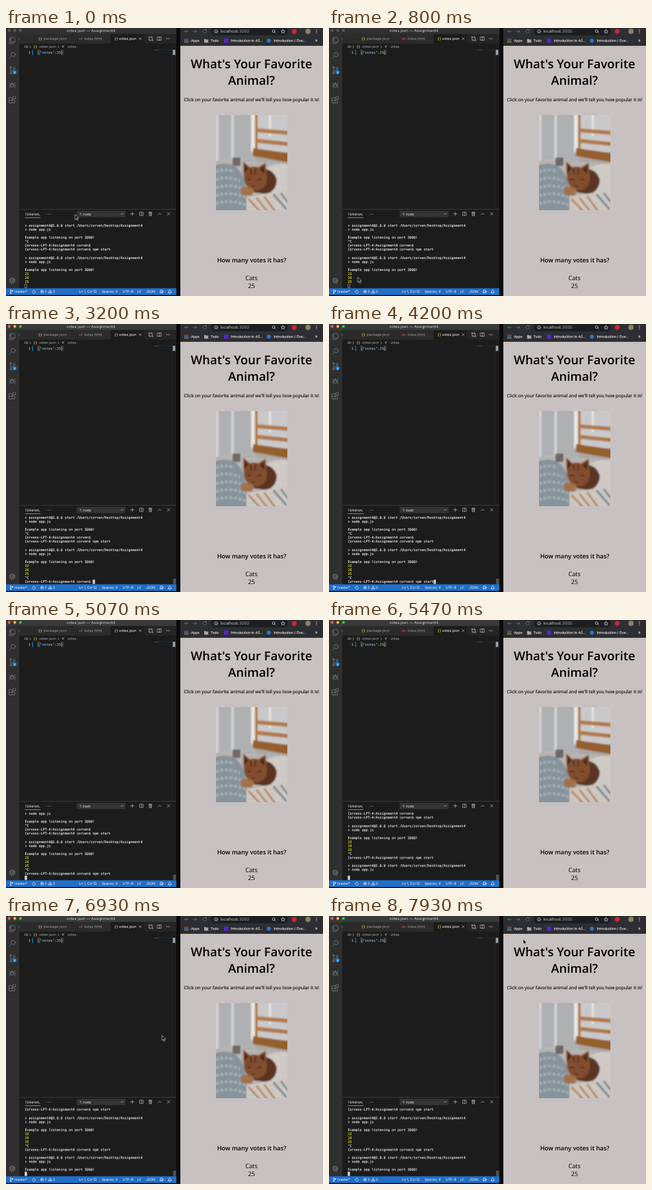
These frames come from a looping animation (480 by 406 pixels, 8 s). An HTML page:

```html
<!DOCTYPE html>
<html lang="en">
<head>
<meta charset="utf-8">
<title>Vote counter demo</title>
<style>
  html, body { margin: 0; width: 100%; height: 100%; overflow: hidden; background: #0b0b0c; }
  .stage { position: relative; width: 480px; height: 406px; overflow: hidden; }
  svg { position: absolute; left: 0; top: 0; }
  text, pre { text-rendering: geometricPrecision; white-space: pre; }
  .ui { font-family: Inter, Roboto, sans-serif; font-size: 5.5px; fill: #ccc; }
  .status { font-size: 5.1px; fill: #fff; }
  .marks { font-size: 5.2px; fill: #f0f0f2; stroke: #f0f0f2; stroke-width: .1; }
  .mono, pre { font-family: "DejaVu Sans Mono", monospace; }
  .page { font-family: "Open Sans", "Noto Sans", sans-serif; font-size: 9.24px; text-anchor: middle; fill: #000; }
  .bold { font-weight: 600; }
  .line { fill: none; stroke: #7d7d7d; stroke-width: .75; stroke-linecap: round; stroke-linejoin: round; }
  .thin { stroke: #c5c5c5; stroke-width: .65; }

  /* terminal: rows are 6.04px high, characters 3.025px wide */
  .term { position: absolute; left: 28.5px; top: 290.4px; width: 222px; height: 103.6px; overflow: hidden; }
  pre { position: absolute; left: 0; top: 6.8px; margin: 0; font-size: 5.025px; line-height: 6.04px; color: #f4f4f4;
        -webkit-text-stroke: .12px; animation: scroll 8s step-end infinite; }
  pre b { font-weight: 400; color: #f0f01c; }
  pre i { font-style: normal; }
  .caret { animation: caret 8s step-end infinite; }

  .focus  { animation: focus 8s step-end infinite; }
  .abort  { animation: abort 8s step-end infinite; }
  .typed  { animation: typed 8s step-end infinite; }
  .listen { animation: listen 8s step-end infinite; }
  .bash   { opacity: 0; animation: bash 8s step-end infinite; }
  .node   { animation: node 8s step-end infinite; }
  .arrow  { animation: arrowPath 8s linear infinite, arrowShow 8s step-end infinite; }
  .beam   { opacity: 0; animation: beamPath 8s linear infinite, beamShow 8s step-end infinite; }

  @keyframes focus  { 0% { opacity: 0 } 15.875%, 100% { opacity: 1 } }
  @keyframes abort  { 0% { opacity: 0 } 38.375%, 100% { opacity: 1 } }
  @keyframes typed  { 0% { opacity: 0 } 50.875%, 100% { opacity: 1 } }
  @keyframes listen { 0% { opacity: 0 } 70%, 100% { opacity: 1 } }
  @keyframes bash   { 0% { opacity: 0 } 40.875% { opacity: 1 } 64.125%, 100% { opacity: 0 } }
  @keyframes node   { 0% { opacity: 1 } 40.875% { opacity: 0 } 64.125%, 100% { opacity: 1 } }
  @keyframes scroll {
    0% { transform: none }
    39.125% { transform: translateY(-6.04px) }
    63.375% { transform: translateY(-12.08px) }
    68.375% { transform: translateY(-36.24px) }
    70%, 100% { transform: translateY(-42.28px) }
  }
  @keyframes caret {
    0% { transform: none }
    38.375% { transform: translateX(6.05px) }
    39.125% { transform: translateX(102.85px) }
    50.875% { transform: translateX(130.08px) }
    63.375%, 100% { transform: none }
  }
  @keyframes arrowPath {
    0%, 5% { transform: translate(104.5px, 282.5px); animation-timing-function: ease-in-out }
    10% { transform: translate(43.5px, 377.5px) }
    15%, 77.4% { transform: translate(44px, 387px) }
    77.5% { transform: translate(225px, 258px) }
    78.375% { transform: translate(248.5px, 246.5px) }
    80%, 83.375% { transform: translate(249px, 246px); animation-timing-function: ease-in }
    87.5% { transform: translate(230px, 150px); animation-timing-function: ease-out }
    93.375%, 97.5% { transform: translate(264.5px, 45px) }
    99.125%, 100% { transform: translate(294px, 35px) }
  }
  @keyframes arrowShow { 0% { opacity: 1 } 15.875% { opacity: 0 } 77.5%, 100% { opacity: 1 } }
  @keyframes beamPath {
    0%, 15.875% { transform: translate(46px, 388px) }
    20.875%, 38.375% { transform: translate(52px, 389.5px) }
    74.125% { transform: translate(54px, 378px) }
    77.5%, 100% { transform: translate(225px, 262px) }
  }
  @keyframes beamShow {
    0% { opacity: 0 } 15.875% { opacity: 1 } 38.375% { opacity: 0 }
    74.125% { opacity: 1 } 77.5%, 100% { opacity: 0 }
  }
</style>
</head>
<body>
<div class="stage">
<svg width="480" height="406" viewBox="0 0 480 406">
  <defs>
    <pattern id="slats" width="4" height="3" patternUnits="userSpaceOnUse">
      <rect width="4" height="3" fill="#989b9f"/><rect width="4" height="1.5" fill="#c3c3c4"/>
    </pattern>
    <clipPath id="frame"><rect x="318" y="132" width="108" height="144"/></clipPath>
    <filter id="soft"><feGaussianBlur stdDeviation="1"/></filter>
  </defs>

  <!-- editor window -->
  <rect width="258" height="404.5" fill="#1c1c1c"/>
  <rect width="258" height="9" fill="#303031"/>
  <g fill="#5b5b5c"><circle cx="4.8" cy="3.7" r="2.1"/><circle cx="13.3" cy="3.7" r="2.1"/><circle cx="21.8" cy="3.7" r="2.1"/></g>
  <g class="focus">
    <rect width="258" height="9" fill="#393939"/>
    <circle cx="4.8" cy="3.7" r="2.1" fill="#fc5b57"/><circle cx="13.3" cy="3.7" r="2.1" fill="#fdbc40"/><circle cx="21.8" cy="3.7" r="2.1" fill="#34c84a"/>
  </g>
  <text class="ui" x="128.5" y="5.8" style="font-size:5.9px" text-anchor="middle">votes.json — Assignment4</text>

  <rect y="9" width="20" height="385.5" fill="#2f2f2f"/>
  <rect x="20" y="9" width="238" height="14.5" fill="#252526"/>
  <path d="M20 9h23v14.5H20zM43.5 9h64v14.5h-64zM108 9h50v14.5h-50z" fill="#2b2b2b"/>
  <rect x="158.5" y="9" width="50.5" height="14.5" fill="#1c1c1c"/>
  <g class="ui">
    <g fill="#999">
      <text x="18.8" y="18">›</text><text x="57" y="18">package.json</text><text x="118.5" y="18">index.html</text>
    </g>
    <text x="171" y="18" fill="#fff">votes.json</text>
    <g class="mono" fill="#d5c93d" font-weight="700" style="font-size:5px">
      <text x="48.8" y="18">{}</text><text x="164" y="18">{}</text><text x="41.5" y="30.4">{}</text>
      <text x="110" y="18" fill="#e06b35">&lt;&gt;</text>
    </g>
    <g fill="#adadad" style="font-size:5.3px">
      <text x="27.5" y="30.4">db</text><text x="50" y="30.4">votes.json</text><text x="84.5" y="30.4">#</text><text x="93" y="30.4">votes</text>
    </g>
  </g>
  <g class="line thin">
    <path d="M201.5 14.5l3.4 3.4m0-3.4l-3.4 3.4M36 26.8l1.5 1.7-1.5 1.7M78.5 26.8l1.5 1.7-1.5 1.7"/>
    <circle cx="216.7" cy="13.8" r=".8"/><circle cx="221.5" cy="18.6" r=".8"/>
    <path d="M216.7 14.8v3.6h2.3m-1-1l1 1-1 1M221.5 17.6V14h-2.3m1-1l-1 1 1 1M229.5 13.5h5.5v5h-5.5zm2.75 0v5"/>
  </g>
  <g fill="#ccc"><circle cx="243" cy="16.2" r=".6"/><circle cx="245" cy="16.2" r=".6"/><circle cx="247" cy="16.2" r=".6"/></g>

  <rect x="39.7" y="33.2" width="1.3" height="7.6" fill="#1580b4"/>
  <g fill="none" stroke="#777" stroke-width=".5"><rect x="48" y="33.5" width="3.2" height="7"/><rect x="83.4" y="33.5" width="3.2" height="7"/></g>
  <text class="mono" x="34" y="38.9" font-size="5.3" fill="#d0d0d0">1</text>
  <text class="mono" x="48" y="38.9" font-size="5.3" fill="#e4e4e4">{<tspan fill="#9cdcfe">"votes"</tspan>:<tspan fill="#b5cea8">25</tspan>}</text>
  <path d="M224 33h28" stroke="#20384f" stroke-width=".8"/><path d="M224 33.7h7" stroke="#526a78" stroke-width=".6"/>
  <path d="M251.5 33v241" stroke="#2c2c2c" stroke-width=".6"/>
  <rect x="252" y="33" width="5" height="8" fill="#555"/><rect x="253.5" y="33" width="2" height="7.5" fill="#a9c8df"/>

  <!-- activity bar -->
  <g class="line">
    <path d="M7.5 14h4l2.2 2.2v5H7.5zM7.5 16H5.3v7.5h6v-2.2"/>
    <circle cx="10.8" cy="40.2" r="3.2"/><path d="M8.4 42.6l-3.2 3.4"/>
    <circle cx="7" cy="59.5" r="1.3"/><circle cx="7" cy="68.5" r="1.3"/><circle cx="12.5" cy="61" r="1.3"/><path d="M7 61v6M12.5 62.500c0 3-5 2-5.500 4"/>
    <circle cx="9.5" cy="86.800" r="2.800"/><path d="M9.5 84v-1.500M7 85l-2-1.500M12 85l2-1.500M6.700 87.500H4.500M12.300 87.500h2.200M7 89l-2 1.800M12 89l2 1.800M8 86h3"/>
    <path d="M5 105.500h4v8H5zM5 109.500h8v4H9M11 104h3.500v3.500H11z"/>
    <circle cx="9.5" cy="382.700" r="1.300"/><circle cx="9.5" cy="382.700" r="3.900" stroke-width="1.400" stroke-dasharray="1.500 1.560" stroke-linecap="butt"/><circle cx="9.5" cy="382.700" r="3.100"/>
  </g>
  <circle cx="13" cy="67" r="3" fill="#1681d8"/>
  <text class="ui status" x="13" y="68.600" text-anchor="middle" style="font-size:4.3px">3</text>

  <!-- panel -->
  <path d="M20 274.700h238" stroke="#4a4a4a" stroke-width=".7"/>
  <path d="M28.500 287.300h24" stroke="#d0d0d0" stroke-width=".6"/>
  <rect x="107.700" y="277.500" width="73" height="8.600" fill="#343434" stroke="#444" stroke-width=".4"/>
  <g class="ui">
    <text x="28.500" y="283.600" fill="#f0f0f0" style="font-size:4.6px">TERMINAL</text>
    <g fill="#f4f4f4" style="font-size:5.1px"><text class="node" x="111.500" y="283.600">1: node</text><text class="bash" x="111.500" y="283.600">1: bash</text></g>
  </g>
  <g fill="#aaa"><circle cx="62" cy="282" r=".6"/><circle cx="64.300" cy="282" r=".6"/><circle cx="66.600" cy="282" r=".6"/></g>
  <g class="line thin">
    <path d="M174 280.800l1.800 1.800 1.800-1.800M188.600 281.500h5.200M191.200 278.900v5.200M202.800 279h5v5h-5zm2.500 0v5"/>
    <path d="M216 279.800h5.200M217.500 279.800v-1h2.200v1M216.700 279.800l.3 4.600h3.200l.3-4.600M218 281v2.200M219.300 281v2.200M230.400 282.700l2.200-2.300 2.200 2.300M244.300 279.600l4 4m0-4l-4 4"/>
  </g>
  <rect class="focus" x="253" y="386" width="4.500" height="8.500" fill="#4e4e4e"/>

  <!-- status bar -->
  <rect y="394.300" width="258" height="10.200" fill="#216fca"/>
  <g class="ui status">
    <text x="13" y="401.200">master*</text><text x="58.500" y="401.200">0</text><text x="71" y="401.200">0</text>
    <text x="110.500" y="401.200">Ln 1, Col 12</text><text x="145" y="401.200">Spaces: 4</text><text x="177" y="401.200">UTF-8</text>
    <text x="199" y="401.200">LF</text><text x="212" y="401.200">JSON</text>
  </g>
  <g class="line thin" style="stroke:#fff">
    <circle cx="7" cy="397.400" r=".7"/><circle cx="7" cy="401.600" r=".7"/><circle cx="9.700" cy="398" r=".7"/><path d="M7 398.200v2.600M9.700 398.800c0 1.500-2.500.7-2.700 2"/>
    <path d="M40 399.300a2.200 2.200 0 0 1 4.200-.8M44.400 399.700a2.200 2.200 0 0 1-4.200.8"/>
    <circle cx="54.500" cy="399.400" r="2.100"/><path d="M53.700 398.600l1.600 1.600m0-1.600l-1.600 1.600M67 397.300l2.300 4.100h-4.600zM67 399v.9"/>
    <circle cx="235.500" cy="399.400" r="2.400"/><path d="M234.400 400.200q1.100 1.100 2.200 0M234.600 398.600v.1M236.400 398.600v.1M245.800 401h4.600l-.7-1v-1.500q-.2-1.400-1.600-1.400t-1.600 1.400v1.500zM247.700 402h.8"/>
  </g>

  <!-- browser chrome -->
  <rect x="264" width="216" height="27" fill="#2d2e31"/>
  <rect x="310" y="-2" width="117" height="13" rx="6" fill="#1d1e21"/>
  <g class="line" style="stroke:#77797d">
    <path d="M276 5.200h-5.200m2.200-2.200l-2.200 2.200 2.200 2.200M283.500 5.200h5.200m-2.200-2.200l2.200 2.200-2.200 2.200"/>
    <path d="M303.300 3.600a2.700 2.700 0 1 0 .3 2.400M303.600 2.200v1.700h-1.700"/>
    <g style="stroke:#d3d5d8">
      <circle cx="318" cy="5.200" r="2.500" stroke-width=".6"/><path d="M318 5v1.400M318 3.800v.1"/>
      <circle cx="405.200" cy="4.800" r="1.900"/><path d="M406.700 6.300l1.800 1.800M419.500 2.200l.9 2 2.100.2-1.600 1.400.5 2.100-1.900-1.100-1.900 1.100.5-2.100-1.600-1.400 2.100-.2z" stroke-width=".7"/>
    </g>
  </g>
  <text class="ui" x="324.500" y="7.400" fill="#fff" style="font-size:6.2px">localhost<tspan fill="#9aa0a6">:3000</tspan></text>
  <circle cx="436.500" cy="5.200" r="3.600" fill="#cf2433"/>
  <circle cx="457.300" cy="5" r="4" fill="#8c8063"/>
  <g fill="#d3d5d8"><circle cx="470" cy="2.800" r=".7"/><circle cx="470" cy="5.200" r=".7"/><circle cx="470" cy="7.600" r=".7"/></g>
  <g stroke-width="1.400" stroke-dasharray="1.400 .8" fill="none">
    <path d="M270.300 17h6" stroke="#e15345"/><path d="M270.300 19.200h6" stroke="#4a8fe8"/><path d="M270.300 21.400h6" stroke="#e9b93d"/>
  </g>
  <path d="M300 16.700h2.500l.8.800h3v4.700H300z" fill="#a3a6aa"/>
  <rect x="330" y="16" width="6.500" height="6.500" fill="#5424cf"/>
  <circle cx="398" cy="19.200" r="3" fill="#2676cf"/>
  <g class="ui marks">
    <text x="280" y="21">Apps</text><text x="309.500" y="21">Todo</text><text x="340.500" y="21">Introduction to A2...</text>
    <text x="405.500" y="21">Introduction / Ove...</text><text x="468" y="21.200" style="font-size:6.5px">»</text>
  </g>

  <!-- page -->
  <rect x="264" y="27" width="216" height="379" fill="#c7c1c1"/>
  <g class="page">
    <g class="bold" style="font-size:18.48px"><text x="371.700" y="60.700">What's Your Favorite</text><text x="371.700" y="85.600">Animal?</text></g>
    <text x="371.800" y="111.400" stroke="#000" stroke-width=".12" style="font-size:6.93px">Click on your favorite animal and we'll tell you how popular it is!</text>
    <text class="bold" x="372" y="355">How many votes it has?</text>
    <text x="371.700" y="381.500">Cats</text><text x="371.700" y="394">25</text>
  </g>

  <g clip-path="url(#frame)"><g filter="url(#soft)">
    <rect x="314" y="128" width="116" height="152" fill="#aaa7a5"/>
    <rect x="314" y="128" width="64" height="76" fill="url(#slats)"/>
    <path d="M314 128h8v84h-8zM341 128h4v70h-4z" fill="#d2d2d3"/>
    <rect x="376" y="128" width="54" height="60" fill="#c9c9cb"/>
    <path d="M371 128h6v60h-6zM398 128h3v36h-3z" fill="#eae5df"/>
    <path d="M377 128h4v66h-4zM381 152l49 4v6l-49-4zM381 168l49 5v6l-49-5z" fill="#b17a4b"/>
    <path d="M374 182l56 8v14l-56-10z" fill="#96602f"/>
    <path d="M314 202q28-6 58 0l58 3v75H314z" fill="#b7b3af"/>
    <path d="M394 212q20-10 36-4v52l-38 4z" fill="#cfcac6"/>
    <path d="M314 209q18-7 32 0 13 9 18 32v39h-50z" fill="#87939b"/>
    <path d="M318 218q14-6 28 0M318 230q18-7 36 2M318 242q20-7 42 2M318 254q20-7 44 2M318 266q20-7 44 2" fill="none" stroke="#a9b2b7" stroke-width="4" stroke-dasharray="4 3"/>
    <rect x="343" y="196" width="12" height="13" rx="2" fill="#706a66"/>
    <path d="M386 212q20 2 24 18 0 14-14 22l-26-4z" fill="#5b3520"/>
    <path d="M359 202l10 9q7-2 13 0l11-7 2 20q1 19-14 22-18 0-21-19z" fill="#824d2d"/>
    <path d="M361 206l6 7-6 7zM391 208l-7 6 7 7z" fill="#4a2b1e"/>
    <path d="M370 213l2 9M378 213l-1 9M365 229l6 1M381 230l6-1M373 239l4 1" stroke="#38211a" stroke-width="1.500"/>
    <path d="M355 243q12-6 21 3l-4 8-15-1z" fill="#a06f4a"/>
    <path d="M364 256l66-12v36h-66z" fill="#cdc7c1"/>
    <path d="M367 259l20 21M379 257l18 23M391 255l18 25" stroke="#b4835a" stroke-width="2.800"/>
    <path d="M405 252l20 23M416 250l14 18" stroke="#76818d" stroke-width="2.800"/>
  </g></g>
</svg>

<div class="term"><pre>&gt; assignment4@1.0.0 start /Users/corven/Desktop/Assignment4
&gt; node app.js

Example app listening on port 3000!
^C
Corvens-LPT-4:Assignment4 corven$
Corvens-LPT-4:Assignment4 corven$ npm start

&gt; assignment4@1.0.0 start /Users/corven/Desktop/Assignment4
&gt; node app.js

Example app listening on port 3000!
<b>23
24
25</b>
<i class="abort">^C</i>
Corvens-LPT-4:Assignment4 corven$ <i class="typed">npm start</i>

&gt; assignment4@1.0.0 start /Users/corven/Desktop/Assignment4
&gt; node app.js

<i class="listen">Example app listening on port 3000!</i>
</pre></div>

<svg width="480" height="406" viewBox="0 0 480 406">
  <g class="caret">
    <rect x="28.800" y="387.900" width="2.700" height="5.400" fill="none" stroke="#bbb" stroke-width=".6"/>
    <rect class="focus" x="28.500" y="387.600" width="3.200" height="6" fill="#d0d0d0"/>
  </g>
  <path class="arrow" d="M0 0v7.500l1.800-1.600 1.300 2.900 1.300-.6-1.300-2.800h2.500z" fill="#000" stroke="#fff" stroke-width=".6"/>
  <path class="beam" d="M-1.500-3.500Q0-3.500 0-2.500 0-3.500 1.500-3.500M0-2.500v5M-1.500 3.500Q0 3.500 0 2.500 0 3.500 1.500 3.500M-.8.800h1.600" fill="none" stroke="#d8d8d8" stroke-width=".8"/>
</svg>
</div>
</body>
</html>
```
